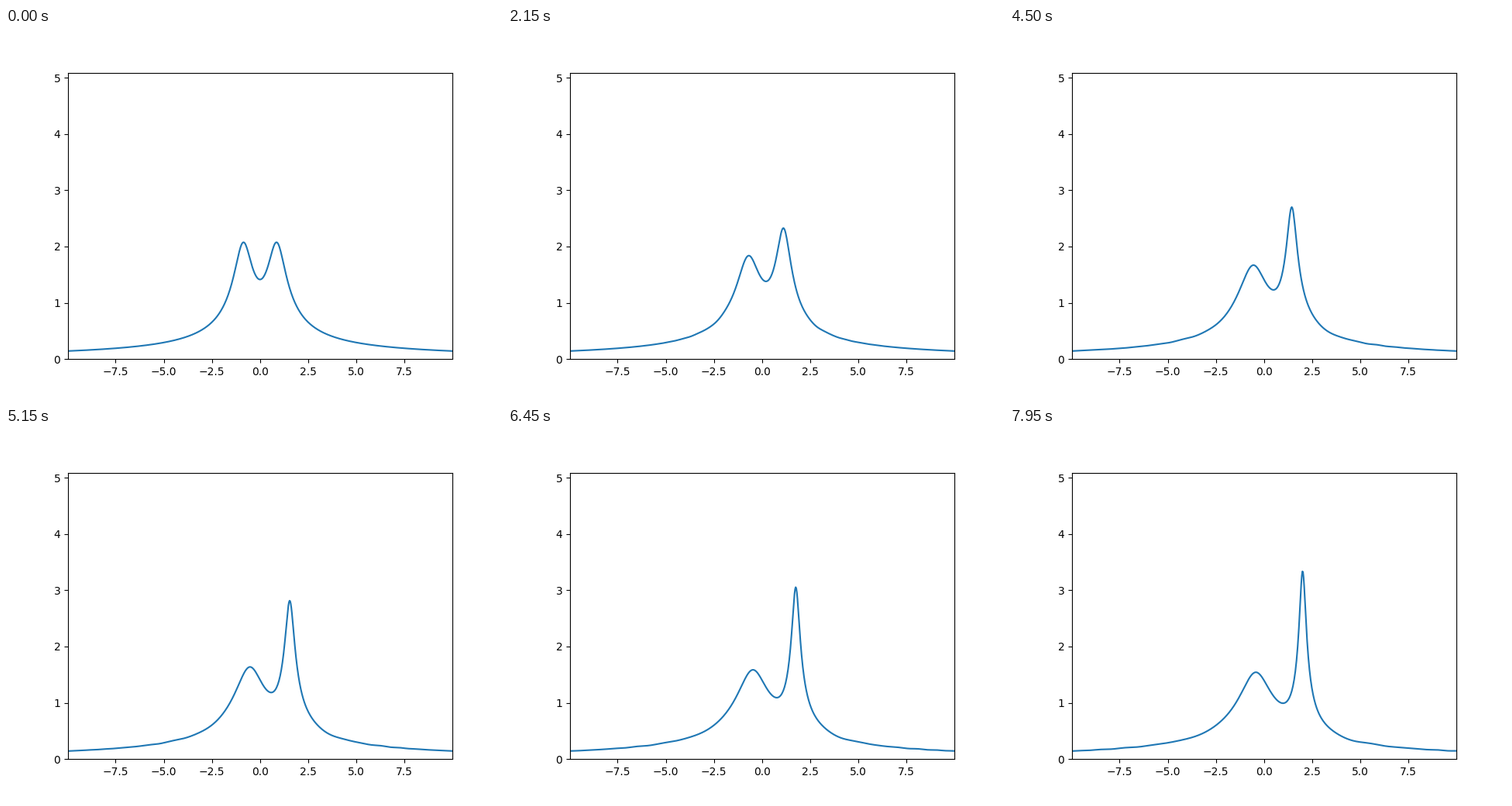
These frames come from a looping animation (640 px wide and 480 px high, 8000 ms). A matplotlib script:

```python
import numpy as np
import matplotlib.pyplot as plt
from matplotlib.animation import FuncAnimation

FRAMES, INTERVAL = 160, 50
DT, SUBSTEPS = 0.00025, 20
KICK = 0.0025
HALF, N = 20 * np.pi, 2 ** 12
X_LIM, Y_LIM = (-9.97, 9.99), (0, 5.09)

x = -HALF + 2 * HALF * np.arange(N) / N
k = 2 * np.pi * np.fft.fftfreq(N, 2 * HALF / N)
# the wave changes sign across the box, so it lives on half-integer modes
twist = np.exp(0.5j * np.pi * x / HALF)
drift = np.exp(-1j * DT * (k + 0.5 * np.pi / HALF) ** 2)


def disperse(v):
    return twist * np.fft.ifft(drift * np.fft.fft(v / twist))


def turn(v, amount):
    """Rotate the phase by the self-focusing potential."""
    rho = np.abs(v) ** 2
    pot = np.fft.ifft(np.abs(k) * np.fft.fft(rho)).real - rho ** 2 / 4
    return v * np.exp(1j * amount * pot)


def solve():
    """Modulus of a slightly defocused two-soliton wave, one row per frame."""
    v = np.sqrt(2 * (x ** 2 + 1) / (x ** 4 - x ** 2 + 1)) * np.exp(1j * np.arctan(x))
    v = turn(v, -KICK)
    rows = []
    for _ in range(FRAMES):
        rows.append(np.abs(v))
        for _ in range(SUBSTEPS):
            v = turn(disperse(turn(v, DT / 2)), DT / 2)
    return np.array(rows)


heights = solve()

fig, ax = plt.subplots(figsize=(6.4, 4.8), dpi=100)
line, = ax.plot(x, heights[0])
ax.set_xlim(*X_LIM)
ax.set_ylim(*Y_LIM)


def draw(i):
    line.set_ydata(heights[i])
    return line,


anim = FuncAnimation(fig, draw, frames=FRAMES, interval=INTERVAL, repeat=True,
                     repeat_delay=0, blit=False)
plt.show()
```
